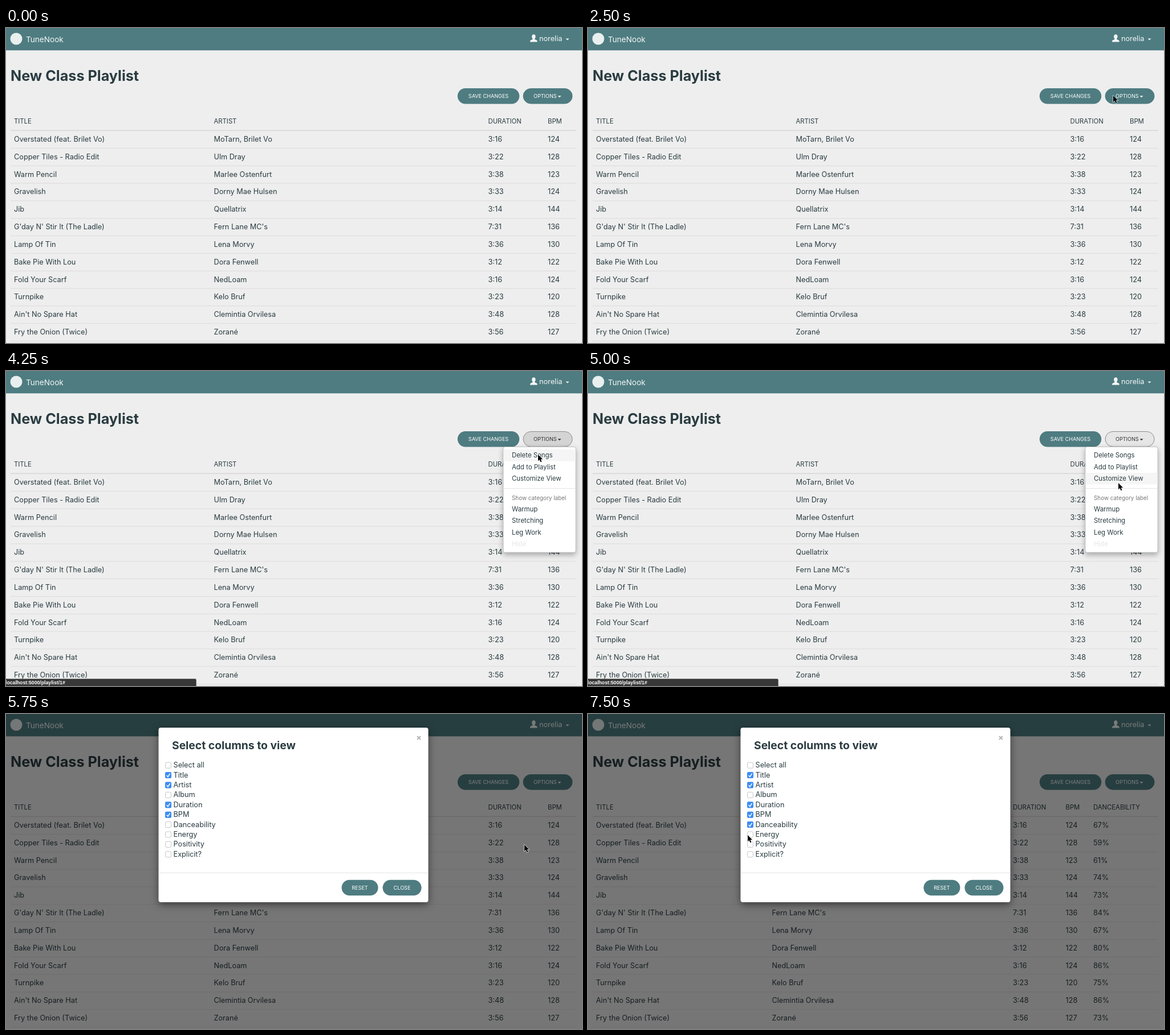
Recreate the animation shown at these times as an HTML page. Size 1010 by 554 pixels, loop 8 s.

```html
<!DOCTYPE html>
<html lang="en">
<head>
<meta charset="utf-8">
<title>Class playlist</title>
<style>
html, body { margin: 0; width: 100%; height: 100%; overflow: hidden; background: #eee; }
svg { display: block; width: 100vw; height: 100vh; font: 400 12.7px Inter, sans-serif; fill: #2a3c41; }
.head { font-size: 11.3px; }
.bold { font-weight: 700; }
.label { font-size: 9.1px; text-anchor: middle; }
.menu { font-size: 11.4px; }
.status { font: bold 8.7px "Liberation Sans", sans-serif; }
.shadow { filter: drop-shadow(0 4px 5px rgba(0, 0, 0, .3)); }
.deep { filter: drop-shadow(0 4px 7px rgba(0, 0, 0, .5)); }
</style>
</head>
<body>
<svg id="stage" viewBox="0 0 1010 554"></svg>
<script>
const TEAL = '#4e7c81';
const songs = `Overstated (feat. Brilet Vo)|MoTarn, Brilet Vo|3:16|124|67%
Copper Tiles - Radio Edit|Ulm Dray|3:22|128|59%
Warm Pencil|Marlee Ostenfurt|3:38|123|61%
Gravelish|Dorny Mae Hulsen|3:33|124|74%
Jib|Quellatrix|3:14|144|73%
G'day N' Stir It (The Ladle)|Fern Lane MC's|7:31|136|84%
Lamp Of Tin|Lena Morvy|3:36|130|67%
Bake Pie With Lou|Dora Fenwell|3:12|122|80%
Fold Your Scarf|NedLoam|3:16|124|86%
Turnpike|Kelo Bruf|3:23|120|75%
Ain't No Spare Hat|Clemintia Orvilesa|3:48|128|86%
Fry the Onion (Twice)|Zorané|3:56|127|73%`.split('\n').map(s => s.split('|'));
const heads = ['TITLE', 'ARTIST', 'DURATION', 'BPM', 'DANCEABILITY'];
const fields = ['Select all', 'Title', 'Artist', 'Album', 'Duration', 'BPM',
  'Danceability', 'Energy', 'Positivity', 'Explicit?'];
const checked = ['Title', 'Artist', 'Duration', 'BPM'];

const text = (x, y, s, attrs = '') => `<text x="${x}" y="${y}" ${attrs}>${s}</text>`;
const rect = (x, y, w, h, fill, attrs = '') =>
  `<rect x="${x}" y="${y}" width="${w}" height="${h}" fill="${fill}" ${attrs}/>`;
const group = (id, body, attrs = '') => `<g id="${id}" ${attrs}>${body}</g>`;
const caret = (x, y, w) => `<path d="M${x} ${y}h${w}l${-w / 2} ${w / 2}z"/>`;
const button = (x, y, w, s) => rect(x, y, w, 27.5, TEAL, 'rx="13.75"') +
  text(x + w / 2, y + 17.2, s, 'class="label" fill="#fff"');

const table = cols => cols.map((x, c) => text(x, 168, heads[c], 'class="head"') +
  songs.map((song, r) => text(x, 200 + r * 30.82, song[c])).join('')).join('');

const lines = songs.map((_, r) => rect(8, 211 + r * 30.82, 992, 1, '#dcdcdc')).join('');

const page = rect(0, 0, 1010, 554, '#eee') + rect(0, 0, 1010, 39.3, TEAL) +
  '<circle cx="18" cy="19" r="10.5" fill="#e9efef"/>' +
  `<g fill="#f4f7f7">${text(35, 25, 'TuneNook', 'font-size="13.6"')}
    ${text(935, 23, 'norelia')}${caret(981.5, 18.5, 6)}
    <ellipse cx="925.3" cy="15.3" rx="3.2" ry="4"/>
    <path d="M919 24.5v-1.5q0-1.3 4.6-3.2v-2h3.4v2q4.6 1.9 4.6 3.2v1.5z"/></g>` +
  text(8, 93, 'New Class Playlist', 'class="bold" font-size="25.2"') +
  button(791.8, 106, 108.4, 'SAVE CHANGES') +
  rect(907, 106.5, 86, 26.5, TEAL, 'id="options" rx="13.25"') +
  group('optionsText', text(945.3, 123.2, 'OPTIONS', 'class="label"') + caret(967.5, 119.3, 6)) +
  rect(8, 179.5, 992, 1.6, '#d8d8d8') + lines +
  group('narrow', table([14, 364.5, 845.5, 950])) +
  group('wide', table([14, 322.5, 745, 837.5, 886]));

const item = (y, s, attrs = '') => text(887, y, s, `class="menu" ${attrs}`);
const menu = rect(872, 133.5, 127, 185.5, '#fff', 'rx="3" stroke="#c4c4c4" class="shadow"') +
  rect(872.5, 138, 126, 20.5, '#f5f5f5', 'id="hover"') +
  item(152, 'Delete Songs') + item(172.5, 'Add to Playlist') + item(193, 'Customize View') +
  rect(872.5, 206, 126, 1, '#e5e5e5') +
  text(887, 227, 'Show category label', 'font-size="9.9" fill="#777"') +
  item(246.7, 'Warmup') + item(267.3, 'Stretching') + item(287.8, 'Leg Work') +
  item(308.3, 'Hide', 'fill="#e6e6e6"');

const tick = y => rect(279, y - 5.5, 11, 11, '#3b8df5', 'rx="2"') +
  `<path d="M281.7 ${y + .3}l2.2 2.6 3.8-5.8" fill="none" stroke="#fff" stroke-width="1.5"/>`;
const fieldRow = (s, i) => {
  const y = 90.2 + i * 17.4;
  return rect(279.5, y - 5, 10, 10, '#fff', 'rx="2" stroke="#c6c6c6"') +
    (checked.includes(s) ? tick(y) : s == 'Danceability' ? group('dance', tick(y)) : '') +
    text(293.5, y + 4, s);
};
const modal = rect(0, 0, 1010, 554, '#000', 'opacity=".5"') +
  rect(267.5, 24, 473, 307, '#fff', 'rx="4" class="deep"') +
  text(291, 62, 'Select columns to view', 'class="bold" font-size="19.3"') +
  '<path d="M721 39l6 6m0-6l-6 6" stroke="#b5b5b5" stroke-width="2"/>' +
  fields.map(fieldRow).join('') + rect(267.5, 279, 473, 1, '#e5e5e5') +
  button(588.5, 291.7, 64, 'RESET') + button(660.5, 291.7, 68, 'CLOSE');

const status = rect(-2, 541.5, 335.5, 16, '#383838', 'rx="2" stroke="#777"') +
  text(-1, 551, 'localhost:5000/playlist/1#', 'class="status" fill="#fff"');

const $ = id => document.getElementById(id);
$('stage').innerHTML = page + group('menu', menu) + group('modal', modal) + group('status', status) +
  `<path id="cursor" d="M0 0V11.3L2.6 9 4.5 13.2 6.4 12.4 4.6 8.2H8.2Z"
    fill="#000" stroke="#fff" stroke-width="1.1" paint-order="stroke"/>`;

// time, x, y of each pointer stop
const stops = [[1500, 835, 107], [1750, 873, 155], [2000, 916, 141], [2250, 920, 124],
  [2500, 921, 119], [3000, 934, 121], [3750, 933, 119], [4000, 933, 139], [4250, 933, 147],
  [4750, 931, 193], [5000, 930, 197], [5750, 909, 230], [6000, 489, 203], [6250, 370, 184],
  [6500, 291, 187], [6750, 281, 196], [7250, 280, 198], [7500, 280, 213]];

const show = (id, on) => $(id).style.display = on ? '' : 'none';

function draw(now) {
  const t = now % 8000, within = (a, b) => t >= a && t < b;
  const stop = stops.findLast(s => t >= s[0]);
  show('cursor', stop);
  if (stop) $('cursor').setAttribute('transform', `translate(${stop[1]} ${stop[2]})`);

  const lit = within(3000, 5250);
  $('options').setAttribute('fill', !lit ? TEAL : within(3250, 5000) ? '#d4d4d4' : '#e6e6e6');
  $('options').setAttribute('stroke', lit ? '#8c8c8c' : TEAL);
  $('optionsText').setAttribute('fill', lit ? '#333' : '#fff');

  show('menu', within(3250, 5250));
  show('hover', t >= 4250);
  $('hover').setAttribute('y', t < 4750 ? 138 : 179);
  show('status', within(4250, 5750));
  $('status').setAttribute('opacity', t < 5500 ? 1 : .5);
  show('modal', t >= 5250);
  show('dance', t >= 7000);
  show('narrow', t < 7000);
  show('wide', t >= 7000);
}

const start = performance.now();
function loop() {
  draw(performance.now() - start);
  requestAnimationFrame(loop);
}
loop();
</script>
</body>
</html>
```
